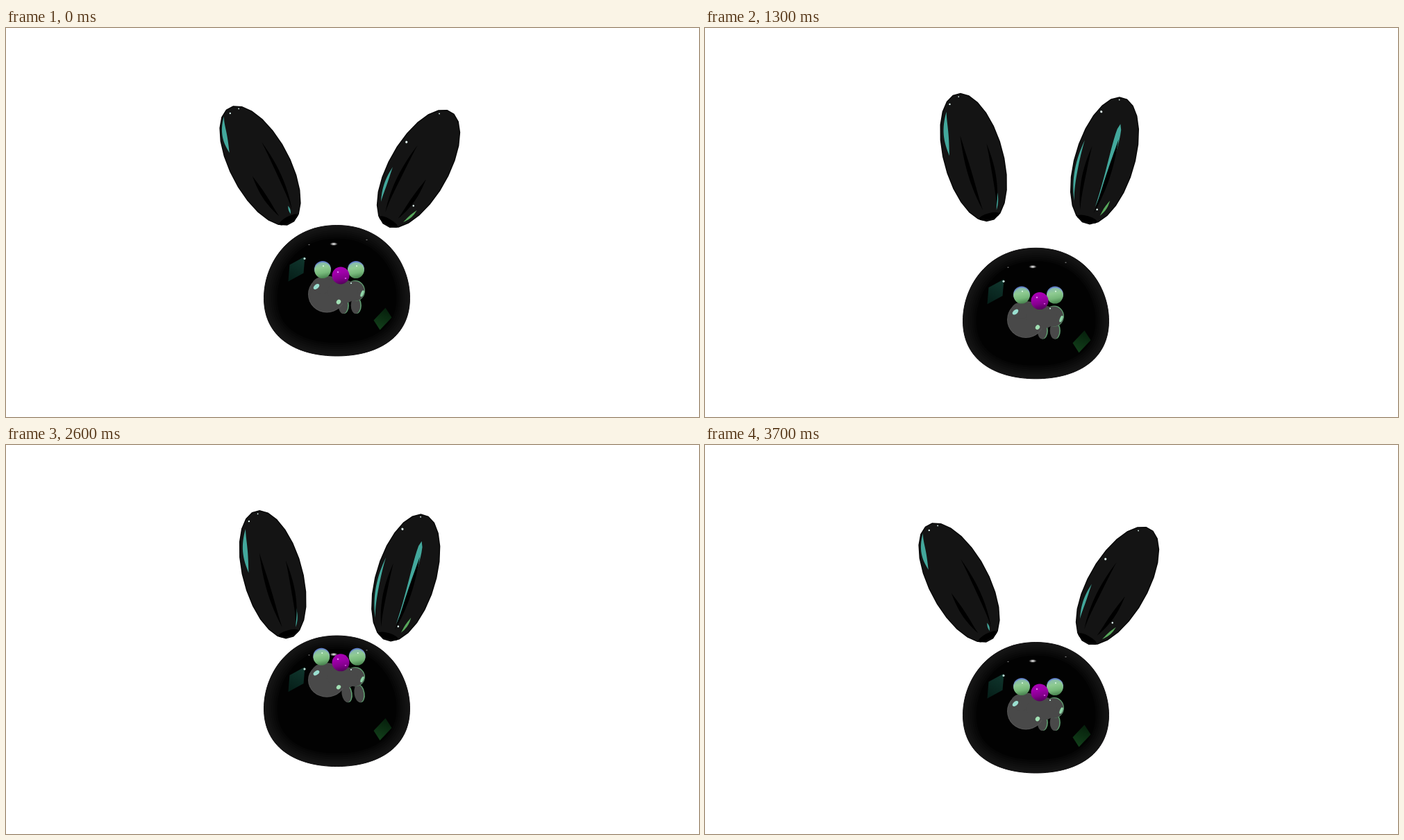
Recreate the animation shown at these times as an HTML page with a canvas. Size 998 px wide and 561 px high, loop 4 s.

```html
<!DOCTYPE html>
<html lang="en">
<head>
<meta charset="utf-8">
<title>Rabbit</title>
<style>
html, body { margin: 0; width: 100%; height: 100%; overflow: hidden; background: #fff; }
canvas { display: block; }
</style>
</head>
<body>
<canvas id="stage" width="998" height="561"></canvas>
<script>
const ctx = document.getElementById('stage').getContext('2d');
const TAU = Math.PI * 2;
const EAR_W = 42.5, EAR_H = 94.5;
const BLACK = '#000', TEAL = '#43a89c', GREEN = '#58a85c', GREY = '#494949', GLINT = '#dff5f0';

const clamp = v => Math.max(0, Math.min(1, v));
const ramp = (t, from, to) => (1 - Math.cos(Math.PI * clamp((t - from) / (to - from)))) / 2;
const bump = (t, from, peak, to) => ramp(t, from, peak) - ramp(t, peak, to);

function ellipse(x, y, rx, ry, fill, turn = 0) {
  ctx.beginPath();
  ctx.ellipse(x, y, rx, ry, turn, 0, TAU);
  ctx.fillStyle = fill;
  ctx.fill();
}

function at(x, y, paint) {
  ctx.save();
  ctx.translate(x, y);
  paint();
  ctx.restore();
}

function gradient(g, colors) {
  colors.forEach((c, i) => g.addColorStop(i / (colors.length - 1), c));
  return g;
}

// Tapered streak along a meridian of the ear; lon runs from -1 to 1 across it.
function streak(lon, top, bottom, width, fill, taper = 1) {
  const steps = 16;
  ctx.beginPath();
  for (const side of [-1, 1]) {
    for (let i = 0; i <= steps; i++) {
      const u = side < 0 ? i / steps : 1 - i / steps;
      const y = top + (bottom - top) * u;
      const x = lon * EAR_W * Math.sqrt(1 - (y / EAR_H) ** 2);
      ctx.lineTo(x + side * width / 2 * Math.sin(Math.PI * u ** taper), y);
    }
  }
  ctx.fillStyle = fill;
  ctx.fill();
}

// Drawn as a left ear; side -1 mirrors it. The ear swings about a pivot at its base.
function ear(side, x, y, pivotX, pivotY, lean, turn, shine) {
  const rad = TAU / 360, open = turn / 12.5;
  at(x, y, () => {
    ctx.scale(side, 1);
    ctx.translate(pivotX, pivotY);
    ctx.rotate(turn * rad);
    ctx.translate(-pivotX, -pivotY);
    ctx.rotate(-lean * rad);
    ctx.beginPath();
    for (let i = 0.5; i < 24; i++) {
      ctx.lineTo(EAR_W * Math.cos(i * TAU / 24), EAR_H * Math.sin(i * TAU / 24));
    }
    ctx.closePath();
    ctx.fillStyle = '#141414';
    ctx.fill();
    ctx.strokeStyle = '#070707';
    ctx.lineWidth = 1.5;
    ctx.stroke();
    ellipse(0, 88, 15, 4.5, BLACK);
    shine(open);
    streak(0.44 + 0.11 * open, -29 + 14 * open, 78, 5, BLACK);
    streak(-0.4 + 0.13 * open, 8 - 42 * open, 77, 6, BLACK);
  });
}

function leftShine(open) {
  streak(-0.78, -87 + 13 * open, -37 + 25 * open, 7, TEAL);
  streak(0.3 + 0.28 * open, 70 - 14 * open, 82, 2.5, TEAL);
  ellipse(-3 - 10 * open, -87 + 4 * open, 1.2, 1.2, GLINT);
  ellipse(11 - 9 * open, -87 - 3 * open, 0.9, 0.9, GLINT);
}

function rightShine(open) {
  streak(0.8 + 0.06 * open, 16 - 35 * open, 68, 4, TEAL);
  streak(-0.78 + 0.1 * open, 53, 78, 3.5, GREEN);
  ctx.globalAlpha = clamp((open - 0.2) * 3);
  streak(-0.2, -57, 68, 8, TEAL, 0.5);
  ctx.globalAlpha = 1;
  ellipse(34 - 9 * open, -25 - 40 * open, 1.6, 1.6, GLINT);
  ellipse(13 - 8 * open, -84 - 6 * open, 0.9, 0.9, GLINT);
  ellipse(-20 + 10 * open, 50 + 20 * open, 1.3, 1.3, GLINT);
}

// Parallelogram around the current origin with half-edges u and v.
function patch(ux, uy, vx, vy, fill) {
  ctx.beginPath();
  ctx.moveTo(-ux - vx, -uy - vy);
  ctx.lineTo(ux - vx, uy - vy);
  ctx.lineTo(ux + vx, uy + vy);
  ctx.lineTo(vx - ux, vy - uy);
  ctx.fillStyle = fill;
  ctx.fill();
}

const skull = new Path2D('M-105 105C-105 56-70 0 0 0S105 56 105 105C105 165 54 188.5 0 188.5S-105 165-105 105Z');

function head() {
  ctx.fillStyle = '#020202';
  ctx.fill(skull);
  ctx.save();
  ctx.clip(skull);
  ctx.strokeStyle = 'rgba(50,46,50,0.09)';
  for (ctx.lineWidth = 8; ctx.lineWidth <= 38; ctx.lineWidth += 6) ctx.stroke(skull);
  ctx.restore();
  ctx.strokeStyle = '#141314';
  ctx.lineWidth = 1;
  ctx.stroke(skull);

  at(-58, 63, () => patch(11, -6, -1, 12, gradient(ctx.createLinearGradient(-8, 16, 8, -16), ['#061f19', '#10362d'])));
  at(66, 135, () => patch(8.5, -9, 4.5, 7, gradient(ctx.createLinearGradient(-6, 14, 6, -14), ['#123f1a', '#06200c'])));
  at(-4.5, 27, () => {
    ctx.scale(1, 0.45);
    ellipse(0, 0, 6, 6, gradient(ctx.createRadialGradient(0, 0, 0, 0, 0, 6), ['#fff', '#888', 'rgba(60,60,60,0)']));
  });
  ellipse(-46.5, 48, 1.6, 1.6, '#bfe0d8');
  ellipse(-40, 28, 1.2, 0.8, '#777');
  ellipse(43, 21, 1.2, 0.8, '#777');
}

function ball(x, y, r, colors) {
  ellipse(x, y, r, r, gradient(ctx.createLinearGradient(x - r * 0.2, y - r, x + r * 0.2, y + r), colors));
}

// The blue rim shrinks faster than the eye, so small eyes are plain green.
function eye(x, size) {
  const r = 11.5 * size, y = -8;
  ball(x, y - 1, 12 * size * size, ['#5a78c8', '#8fb4c8', '#4f8a58']);
  ball(x, y + 0.5, r, ['#86b9b0', '#8fcb92', '#76b87a', '#457f4c']);
  ellipse(x + 1, y - r * 0.5, 1, 1, '#e4ffe4');
}

function mouth(tilt) {
  ctx.scale(1, 1 - 0.07 * tilt);
  for (const x of [486, 504]) {
    const toothX = x - 482 + 5 * tilt, toothY = 43 + 5 * tilt, lean = -0.15 * tilt;
    ellipse(toothX + 0.7, toothY, 7.2, 12 + 2 * tilt, '#5f9f70', lean);
    ellipse(toothX - 0.5, toothY, 6.8, 12 + 2 * tilt, GREY, lean);
  }
  ellipse(21, 22, 14, 15, '#64a576');
  ellipse(20, 22.5, 14, 14.5, GREY);
  ellipse(-20, 27, 27, 26.5, '#555');
  ellipse(-20, 27, 26, 25.5, GREY);
  ellipse(-27, 14, 14, 12, GREY);
  ellipse(3, 23, 22, 17, GREY);
  ellipse(-35, 16, 5, 3, '#9adfd0', -0.7);
  ellipse(-3, 38, 3, 3.5, '#a2e0b4', 0.6);
  ellipse(31, 26, 2, 5, '#8fd5a7', 0.4);
  ellipse(15, 11, 1, 1, '#d5fff0');
}

function face(tilt, eyeSize, eyeGap) {
  at(0, 0, () => mouth(tilt));
  eye(-2 - eyeGap, eyeSize);
  eye(-2 + eyeGap, eyeSize);
  ball(0, 0, 12.5, ['#a900b4', '#a000ab', '#84008d', '#520059']);
  ellipse(-4, -5, 1.1, 1.1, '#f0a0ff');
  ellipse(7, 4, 1.3, 0.9, '#df55e8');
}

function draw(now) {
  const t = Math.floor(now % 4000 / 50) * 50;
  const turn = 17 * (bump(t, 0, 960, 2000) + bump(t, 2000, 2900, 3500));
  const earShift = -3 * bump(t, 2000, 2900, 3500);
  const headY = 284.5 + 36 * ramp(t, 0, 1200) - 84 * ramp(t, 1200, 2000)
    + 55 * ramp(t, 2000, 2950) - 7 * ramp(t, 2950, 3500);
  const noseY = 357 + 38 * ramp(t, 0, 1200) - 86 * ramp(t, 1200, 2420) + 48 * ramp(t, 2420, 3300);
  const eyeSize = 1 - 0.44 * bump(t, 1300, 2000, 2550);
  const eyeGap = 24 + 2 * bump(t, 1300, 2300, 3600);

  ctx.fillStyle = '#fff';
  ctx.fillRect(0, 0, 998, 561);
  ear(1, 366 + earShift, 198.5, 63, 85.5, 27.8, turn, leftShine);
  ear(-1, 594, 203, 61, 76, 29.5, turn, rightShine);
  at(476.5, headY, head);
  at(482, noseY, () => face(clamp((350 - noseY) / 38), eyeSize, eyeGap));
}

let start;
function tick(now) {
  start ??= now;
  draw(now - start);
  requestAnimationFrame(tick);
}
draw(0);
requestAnimationFrame(tick);
</script>
</body>
</html>
```
